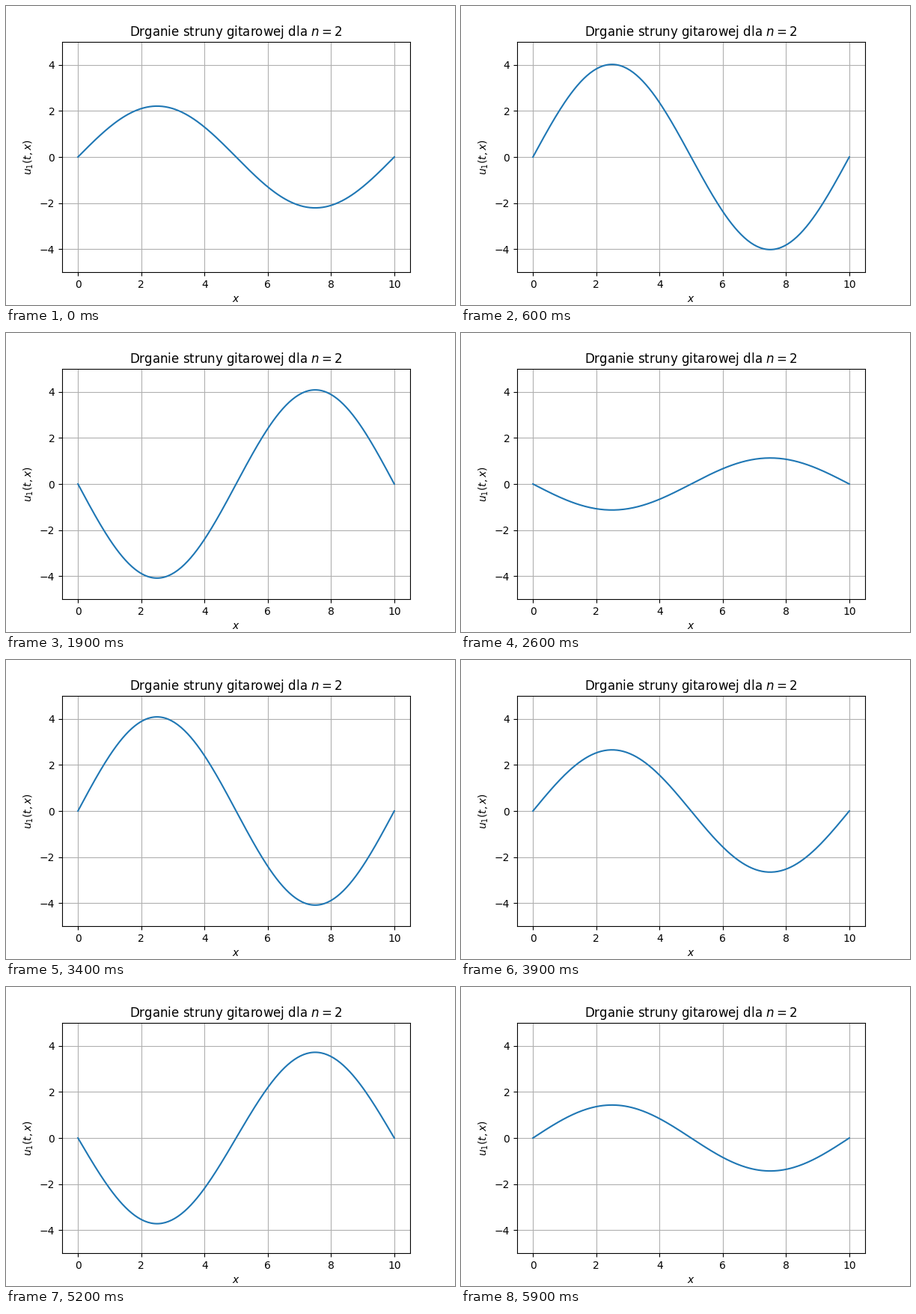
Write a matplotlib script that moves like this. It is 600 px wide and 400 px high and loops after 6000 ms.

```python
import numpy as np
import matplotlib.pyplot as plt
from matplotlib.animation import FuncAnimation

FRAMES = 60
PERIOD = 30          # frames per full oscillation
LENGTH = 10          # string length
MODE = 2
COS_AMP, SIN_AMP = 2.21, 3.51

x = np.linspace(0, LENGTH, 200)
shape = np.sin(MODE * np.pi * x / LENGTH)


def displacement(frame):
    phase = 2 * np.pi * frame / PERIOD
    return (COS_AMP * np.cos(phase) + SIN_AMP * np.sin(phase)) * shape


fig, ax = plt.subplots(figsize=(6, 4), dpi=100)
ax.set_xlim(-0.5, 10.5)
ax.set_ylim(-5, 5)
ax.set_title(f"Drganie struny gitarowej dla $n={MODE}$")
ax.set_xlabel("$x$")
ax.set_ylabel("$u_1(t,x)$")
ax.grid()
string, = ax.plot(x, displacement(0))


def update(frame):
    string.set_ydata(displacement(frame))
    return string,


anim = FuncAnimation(fig, update, frames=FRAMES, interval=100, repeat=True)
plt.show()
```
